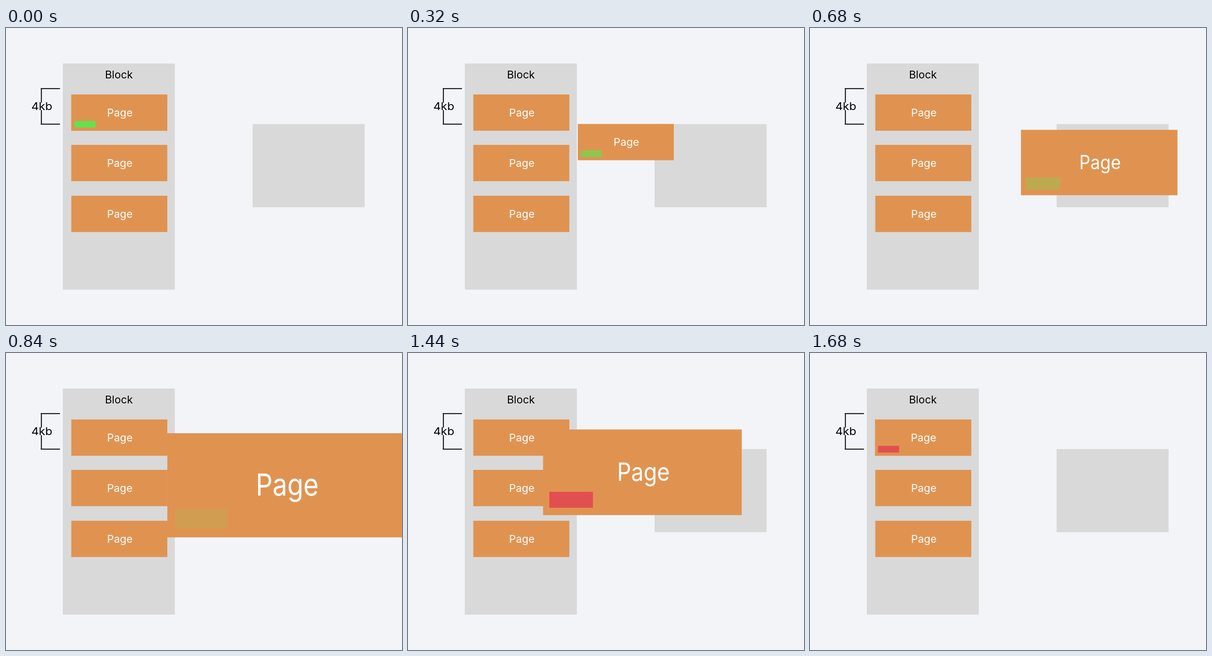
An HTML page that plays this animation: 864 by 648 pixels, repeating every 2000 ms.

```html
<!DOCTYPE html>
<html lang="en">
<head>
<meta charset="utf-8">
<title>Block and pages</title>
<style>
html, body { margin: 0; width: 100%; height: 100%; overflow: hidden; background: #f2f4f8; }
svg { display: block; width: 864px; height: 648px; }
text { font: 23.2px Inter, sans-serif; text-anchor: middle; }
.gray { fill: #d9d9d9; }
.page rect { fill: #e09351; }
.page text { fill: #fff; }
.bracket { fill: none; stroke: #000; stroke-width: 2; stroke-linecap: round; }
</style>
</head>
<body>
<svg viewBox="0 0 864 648">
  <defs>
    <g id="page" class="page">
      <rect width="209.5" height="79.2"/>
      <text x="105.9" y="47.5">Page</text>
    </g>
  </defs>
  <rect class="gray" x="124" y="77.5" width="244.4" height="493.3"/>
  <rect class="gray" x="538" y="209.6" width="244.4" height="181.4"/>
  <text x="246.3" y="110">Block</text>
  <path class="bracket" d="M117 132.3H76.5M77.2 132.3V162M77.2 180V209.8M76.5 209.8H117"/>
  <text transform="translate(78.2 178.5) scale(1.1 1)">4kb</text>
  <use href="#page" x="142.5" y="145"/>
  <use href="#page" x="142.4" y="255"/>
  <use href="#page" x="142.5" y="366"/>
  <g id="mover">
    <use href="#page"/>
    <rect id="green" x="6.6" y="57.6" width="46" height="14.8" fill="#66e04f"/>
    <rect id="red" x="6.6" y="57.6" width="46" height="14.8" fill="#e14f51"/>
  </g>
</svg>
<script>
const LOOP = 2000, STEP = 40;
const [mover, green, red] = ['mover', 'green', 'red'].map(id => document.getElementById(id));

// Poses: x, y, scale x, scale y
const home = [142.5, 145, 1, 1];
const cache = [541.5, 257.6, 1, 1];
const zoomed = [352, 175, 2.47, 2.87];
const back = [141.9, 145, 1, 1];

const ramp = (t, from, to) => Math.min(1, Math.max(0, (t - from) / (to - from)));
const mix = (a, b, p) => a.map((v, i) => v + (b[i] - v) * p);

function poseAt(t) {
  if (t < 560) return mix(home, cache, ramp(t, 0, 560));
  if (t < 1350) return mix(cache, zoomed, ramp(t, 560, 840));
  return mix(zoomed, back, ramp(t, 1350, 1680));
}

function draw() {
  const t = Math.floor(performance.now() % LOOP / STEP) * STEP;
  const [x, y, sx, sy] = poseAt(t);
  mover.setAttribute('transform', `translate(${x} ${y}) scale(${sx} ${sy})`);
  green.setAttribute('opacity', t < 1240 ? 1 - 0.88 * ramp(t, 0, 840) : 0);
  red.setAttribute('opacity', ramp(t, 1040, 1240));
  requestAnimationFrame(draw);
}
draw();
</script>
</body>
</html>
```
